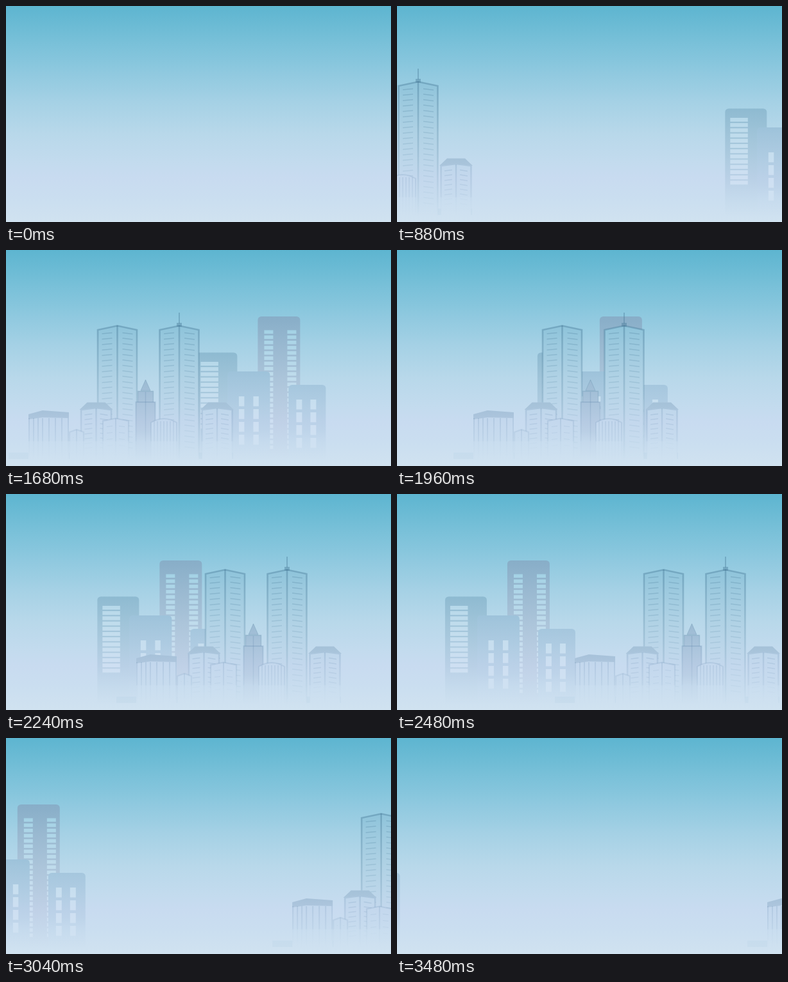
Recreate the animation shown at these times as an HTML page with a canvas. Size 600 px wide and 338 px high, loop 5520 ms.

```html
<!DOCTYPE html>
<html lang="en">
<head>
<meta charset="utf-8">
<title>Passing skylines</title>
<style>
html, body { margin: 0; width: 100%; height: 100%; overflow: hidden; background: #b8d8ea; }
canvas { display: block; width: 600px; height: 338px; }
</style>
</head>
<body>
<canvas id="stage" width="600" height="338"></canvas>
<script>
const W = 600, H = 338, LOOP = 5520, STEP = 40, START = 560, END = 3480;
const ctx = document.getElementById('stage').getContext('2d');

// [time, x of the antenna]
const PATH = [[560, -63], [880, 33], [1240, 142], [1680, 270], [2240, 438], [2720, 586], [3480, 812]];

function ramp(stops) {
  const g = ctx.createLinearGradient(0, 0, 0, H);
  for (const [y, color] of stops) g.addColorStop(y / H, color);
  return g;
}

// A tint that melts into the haze towards the ground
function tint(rgb, top, strength) {
  const at = (y, k) => [y, `rgba(${rgb},${strength * k})`];
  return ramp([at(top, 1), at(top + (330 - top) * 0.65, 0.4), at(300, 0.16), at(330, 0)]);
}

const SKY = ramp([[0, '#5db5d0'], [60, '#7ac1d9'], [110, '#92cae0'], [150, '#a5d1e5'],
  [200, '#b8d8ea'], [245, '#c3dbee'], [268, '#c8dbf0'], [300, '#cadef0'], [338, '#d0e2f0']]);
const WALL = tint('85,140,170', 110, 0.13);
const EDGE = tint('70,120,150', 110, 0.42);
const DASH = tint('75,125,155', 110, 0.32);
const ROOF = tint('75,115,150', 235, 0.25);
const SPIRE = tint('85,115,155', 200, 0.3);
const LOW = tint('80,120,160', 240, 0.2);
const LOWWALL = tint('100,140,180', 240, 0.06);
const GREY = tint('80,130,160', 160, 0.3);
const MAUVE = tint('120,118,152', 104, 0.33);
const BLUE = tint('95,140,178', 190, 0.27);
const PANE = 'rgba(255,255,255,.1)';

function trace(points) {
  ctx.beginPath();
  points.forEach(([x, y]) => ctx.lineTo(x, y));
  ctx.closePath();
}

function solid(paint) {
  ctx.fillStyle = SKY;
  ctx.fill();
  ctx.fillStyle = paint;
  ctx.fill();
}

function shape(points, paint, edge, width) {
  trace(points);
  solid(paint);
  if (edge) {
    ctx.strokeStyle = edge;
    ctx.lineWidth = width;
    ctx.stroke();
  }
}

function line(x1, y1, x2, y2, paint, width) {
  ctx.beginPath();
  ctx.moveTo(x1, y1);
  ctx.lineTo(x2, y2);
  ctx.strokeStyle = paint;
  ctx.lineWidth = width;
  ctx.stroke();
}

function dashes(cx, inner, outer, top, gap, bottom, paint) {
  for (let y = top; y < bottom; y += gap) {
    line(cx - outer, y + 1, cx - inner, y - 0.5, paint, 1.4);
    line(cx + inner, y - 0.5, cx + outer, y + 1.5, paint, 1.4);
  }
}

function tower(cx) {
  shape([[cx - 30.5, 340], [cx - 30.5, 125], [cx, 118.5], [cx + 30.5, 125], [cx + 30.5, 340]], WALL, EDGE, 2.6);
  line(cx, 118, cx, 335, EDGE, 2.6);
  dashes(cx, 8, 24, 130, 8.5, 312, DASH);
}

function antenna(cx) {
  line(cx, 98, cx, 115, EDGE, 1.8);
  ctx.fillStyle = EDGE;
  ctx.fillRect(cx - 4, 114, 8, 6);
}

function spire(cx) {
  shape([[cx - 7.5, 220], [cx, 203], [cx + 7.5, 220]], SPIRE, EDGE, 1);
  shape([[cx - 12, 340], [cx - 12, 221], [cx + 12, 221], [cx + 12, 340]], SPIRE, EDGE, 1.5);
  shape([[cx - 15, 340], [cx - 15, 238], [cx + 15, 238], [cx + 15, 340]], SPIRE, LOW, 2);
  line(cx, 222, cx, 330, LOW, 1.5);
}

function house(cx) {
  shape([[cx - 23.5, 340], [cx - 23.5, 250], [cx, 247], [cx + 23.5, 250], [cx + 23.5, 340]], LOWWALL, LOW, 2.6);
  line(cx, 248, cx, 335, LOW, 2.4);
  dashes(cx, 6, 18, 257, 7.5, 315, LOW);
  shape([[cx - 26, 250], [cx - 14, 238.5], [cx + 14, 238.5], [cx + 26, 250], [cx, 247.5]], ROOF);
}

function hut(cx, half, top) {
  shape([[cx - half, 340], [cx - half, top + 4], [cx, top], [cx + half, top + 4], [cx + half, 340]], LOWWALL, LOW, 2.2);
  line(cx, top, cx, 335, LOW, 2);
  for (let y = top + 12; y < 315; y += 10) {
    line(cx - half + 6, y + 1, cx - 5, y, LOW, 1);
    line(cx + 5, y, cx + half - 6, y + 1, LOW, 1);
  }
}

function columns(cx) {
  ctx.beginPath();
  ctx.moveTo(cx - 20, 340);
  ctx.lineTo(cx - 20, 270);
  ctx.quadraticCurveTo(cx, 258, cx + 20, 270);
  ctx.lineTo(cx + 20, 340);
  solid(LOWWALL);
  ctx.strokeStyle = LOW;
  ctx.lineWidth = 2;
  ctx.stroke();
  for (let x = -15; x <= 15; x += 5) line(cx + x, 268, cx + x, 330, LOW, 1.6);
}

function hall(x) {
  shape([[x, 340], [x, 257], [x + 22, 251], [x + 63, 254], [x + 63, 340]], LOWWALL);
  trace([[x, 265], [x, 257], [x + 22, 251], [x + 63, 254], [x + 63, 263], [x + 22, 262]]);
  ctx.fillStyle = ROOF;
  ctx.fill();
  for (const dx of [1, 8, 15, 22, 32, 42, 52, 62]) line(x + dx, 263, x + dx, 335, LOW, 2);
}

function leftCity(a) {
  ctx.fillStyle = 'rgba(110,150,185,.06)';
  ctx.fillRect(a - 266, 317, 350, 10);
  tower(a - 96.5);
  tower(a);
  antenna(a);
  spire(a - 52.5);
  house(a - 129.5);
  house(a + 59);
  columns(a - 24);
  hut(a - 99, 20, 263.5);
  hall(a - 235);
  hut(a - 160, 11, 281);
}

function block(x, y, w, paint) {
  ctx.beginPath();
  ctx.roundRect(x, y, w, 345 - y, 5.5);
  solid(paint);
}

function panes(xs, w, h, top, gap, rows) {
  for (const x of xs) {
    for (let i = 0; i < rows; i++) {
      ctx.beginPath();
      ctx.rect(x, top + i * gap, w, h);
      solid(PANE);
    }
  }
}

function rightCity(b) {
  block(b, 160.5, 65, GREY);
  panes([b + 8], 27.5, 6, 175, 8.2, 13);
  block(b + 97, 104, 66, MAUVE);
  panes([b + 107, b + 143], 14, 5.5, 125.5, 8.2, 23);
  block(b + 50, 190, 66, BLUE);
  panes([b + 67.5, b + 90], 8.5, 15.5, 229, 20, 4);
  block(b + 145, 211, 58, BLUE);
  panes([b + 157, b + 179], 9, 15.5, 234, 20, 4);
}

function antennaAt(t) {
  let i = 1;
  while (i < PATH.length - 1 && t > PATH[i][0]) i++;
  const [t0, x0] = PATH[i - 1], [t1, x1] = PATH[i];
  return x0 + (x1 - x0) * (t - t0) / (t1 - t0);
}

function draw(t) {
  ctx.fillStyle = SKY;
  ctx.fillRect(0, 0, W, H);
  if (t < START) return;
  const a = antennaAt(Math.min(t, END));
  rightCity(412 - (a - 142) * 0.911);
  leftCity(a);
}

const begin = performance.now();
function tick() {
  const t = (performance.now() - begin) % LOOP;
  draw(Math.floor(t / STEP) * STEP);
  requestAnimationFrame(tick);
}
tick();
</script>
</body>
</html>
```
